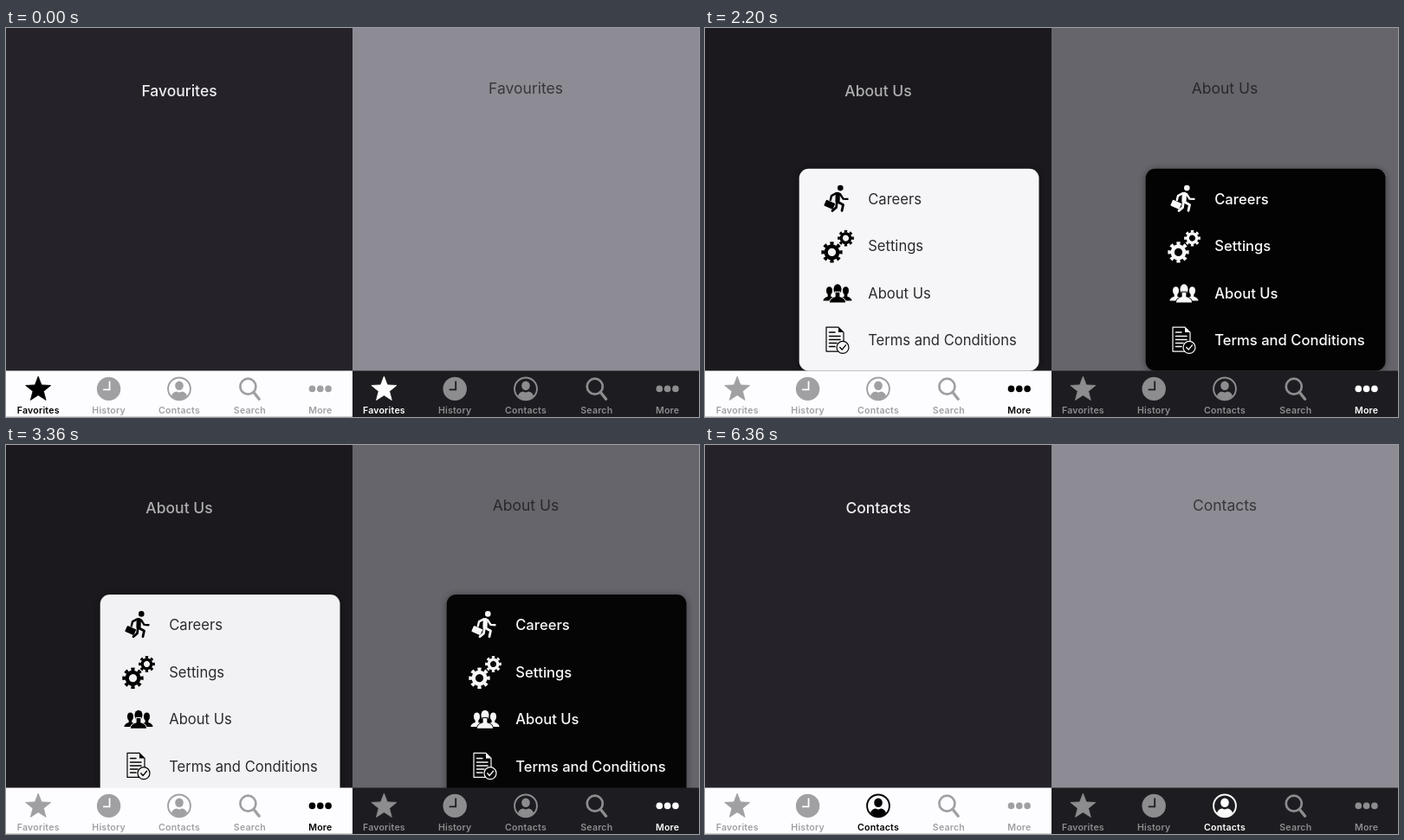
Animation of 800x450 px, one loop 7640 ms. Source, as an HTML page:

```html
<!DOCTYPE html>
<html lang="en">
<head>
<meta charset="utf-8">
<title>Tab bar with pop-up menu, light and dark</title>
<style>
  html, body { margin: 0; height: 100%; overflow: hidden; }
  svg { display: block; width: 800px; height: 450px; font-family: Inter, Roboto, sans-serif; }
  .line { fill: none; stroke: currentColor; stroke-linecap: round; stroke-linejoin: round; }
  .icon { fill: currentColor; }
  .title { font-size: 17.5px; text-anchor: middle; }
  .item { font-size: 16.6px; }
  .tab text { font-size: 10.6px; font-weight: 600; letter-spacing: .2px; text-anchor: middle; fill: currentColor; }
  .menu { filter: drop-shadow(0 1px 4px rgba(0, 0, 0, .45)); }
</style>
</head>
<body>
<svg id="stage" viewBox="0 0 800 450"></svg>
<script>
const LOOP = 7640;
const TRAVEL = 253;

const themes = [
  { x: 0, step: 81.4, page: '#252329', title: '#eeedf0', titleY: 78.6, weight: 500, card: '#fdfcfe', ink: '#000',
    label: '#2c2b2e', itemWeight: 400, bar: '#fdfcfe', edge: '#cfced1', idle: '#a09fa2', active: '#000' },
  { x: 400, step: 81.8, page: '#8d8b93', title: '#38373b', titleY: 76.2, weight: 400, card: '#010102', ink: '#fff',
    label: '#fff', itemWeight: 500, bar: '#1d1c20', edge: '#1d1c20', idle: '#8d8c8f', active: '#fff' }
];

const star = Array.from({ length: 10 }, (_, i) => {
  const r = i % 2 ? 6.5 : 15.2, a = i * Math.PI / 5;
  return (r * Math.sin(a)).toFixed(1) + ',' + (.8 - r * Math.cos(a)).toFixed(1);
}).join(' ');

// Tab icons are centred on the origin.
const tabs = [
  ['Favorites', () => `<polygon points="${star}" stroke="currentColor" stroke-width=".8" stroke-linejoin="round"/>`],
  ['History', bar => `<circle r="13.7"/><path d="M1 -9V1H-6.5" fill="none" stroke="${bar}" stroke-width="1.8"/>`],
  ['Contacts', () => `<circle r="12.9" class="line" stroke-width="1.9"/><ellipse cy="-3.6" rx="4.8" ry="5.3"/>
    <path d="M-9 8.2Q-7.5 3.8 -3 3.2Q0 5 3 3.2Q7.5 3.8 9 8.2Q5 12.4 0 12.4T-9 8.2Z"/>`],
  ['Search', () => `<circle cx="-2" cy="-2.7" r="9" class="line" stroke-width="2.7"/>
    <path d="M5 4.6L10.8 11.8" class="line" stroke-width="3.4"/>`],
  ['More', () => [-9.3, 0, 9.3].map(x => `<circle cx="${x}" r="3.8"/>`).join('')]
];

const gear = (x, y, r) => `<g class="line" transform="translate(${x} ${y}) rotate(-11.25)" style="stroke-linecap:butt">
  <circle r="${r * .56}" stroke-width="${r * .36}"/>
  <circle r="${r * .85}" stroke-width="${r * .3}" pathLength="16" stroke-dasharray="1"/></g>`;

const person = (x, y, s) => `<g transform="translate(${x} ${y}) scale(${s})"><ellipse cy="-15.5" rx="4.6" ry="6"/>
  <path d="M-2.4 -12H2.4V-6.5Q9 -4.6 9.3 0H-9.3Q-9 -4.6 -2.4 -6.5Z"/></g>`;

// Menu icons use the panel coordinates of the open menu.
const items = [
  ['Careers', () => `<circle cx="156.3" cy="168" r="3.3"/>
    <rect x="-5.6" y="-3.6" width="11.2" height="7.4" rx="1" transform="translate(143.8 187) rotate(24)"/>
    <path d="M153.3 175.2L153 183" class="line" stroke-width="5.2"/>
    <path d="M151.5 174L146 177L144.8 182M156 175L159.5 180.5L164.5 180.8" class="line" stroke-width="2.4"/>
    <path d="M154 184.5L159.5 187.5L158 194.3M152.2 185L151.5 190.5L147 194.3" class="line" stroke-width="2.8"/>`],
  ['Settings', () => gear(146.5, 242.3, 12.2) + gear(162.5, 226, 9.4)],
  ['About Us', card => person(143.5, 298.5, .76) + person(162.5, 298.5, .76) +
    `<g stroke="${card}" stroke-width="1.8" paint-order="stroke">${person(153, 300.3, .98)}</g>`],
  ['Terms and Conditions', card => `<path d="M140 329H154L160 335V357H140Z" class="line" stroke-width="1.2"/>
    <path d="M154 329V335H160Z"/>
    <path d="M143.5 335H150M143.5 339.5H156M143.5 343.5H156M143.5 347.5H152M143.5 351.5H150" class="line" stroke-width="1.5"/>
    <circle cx="159" cy="352.3" r="7" fill="${card}" stroke="currentColor" stroke-width="1.2"/>
    <path d="M155.8 352.4L158.2 355L162.5 349.8" class="line" stroke-width="1.4"/>`]
];

const panel = c => `<g transform="translate(${c.x})">
  <rect width="400" height="450" fill="${c.page}"/>
  <text class="title" x="200" y="${c.titleY}" fill="${c.title}" font-weight="${c.weight}"></text>
  <rect class="shade" width="400" height="397"/>
  <g class="menu">
    <rect x="108.7" y="145.6" width="276.8" height="233.8" rx="11" fill="${c.card}"/>
    <g class="icon" color="${c.ink}">${items.map(([, draw]) => draw(c.card)).join('')}</g>
    ${items.map(([name], i) => `<text class="item" x="188.2" y="${187 + i * 54.4}" fill="${c.label}"
      font-weight="${c.itemWeight}">${name}</text>`).join('')}
  </g>
  <rect y="396.5" width="400" height="54" fill="${c.bar}"/>
  <rect y="449" width="400" height="1" fill="${c.edge}"/>
  ${tabs.map(([name, draw], i) => `<g class="tab icon" transform="translate(${200 + (i - 2) * c.step} 417.4)">
    ${draw(c.bar)}<text y="28.3">${name}</text></g>`).join('')}
</g>`;

const stage = document.getElementById('stage');
stage.innerHTML = themes.map(panel).join('');
const panels = [...stage.children].map((g, i) => ({
  theme: themes[i],
  title: g.querySelector('.title'),
  shade: g.querySelector('.shade'),
  menu: g.querySelector('.menu'),
  tabs: [...g.querySelectorAll('.tab')]
}));

// visible from, title, selected tab
const screens = [[0, 'Favourites', 0], [2200, 'About Us', 4], [4360, 'Settings', 4], [6320, 'Contacts', 2]];
// visible from, starts, duration, opening
const moves = [[600, 600, 200, true], [2200, 2110, 350, false], [3200, 3200, 240, true], [4360, 4360, 240, false]];
const latest = (list, t) => list.filter(entry => t >= entry[0]).pop();

function menuState(t) {
  const move = latest(moves, t);
  if (!move) return { open: 0, dim: 0 };
  const [, start, duration, opening] = move;
  const p = Math.min(1, (t - start) / duration);
  const open = opening ? p : 1 - p;
  return { open, dim: Math.min(1, opening ? .4 + open : 1.6 * open) };
}

function render(t) {
  const [, title, selected] = latest(screens, t);
  const { open, dim } = menuState(t);
  const drop = TRAVEL * (1 - open) ** 2;
  for (const p of panels) {
    p.title.textContent = title;
    p.shade.setAttribute('opacity', .275 * dim);
    p.menu.setAttribute('transform', `translate(0 ${drop})`);
    p.menu.setAttribute('opacity', dim ? 1 - drop / 600 : 0);
    p.tabs.forEach((tab, i) => tab.setAttribute('color', i === selected ? p.theme.active : p.theme.idle));
  }
}

const begin = performance.now();
function tick() {
  render((performance.now() - begin) % LOOP);
  requestAnimationFrame(tick);
}
tick();
</script>
</body>
</html>
```
